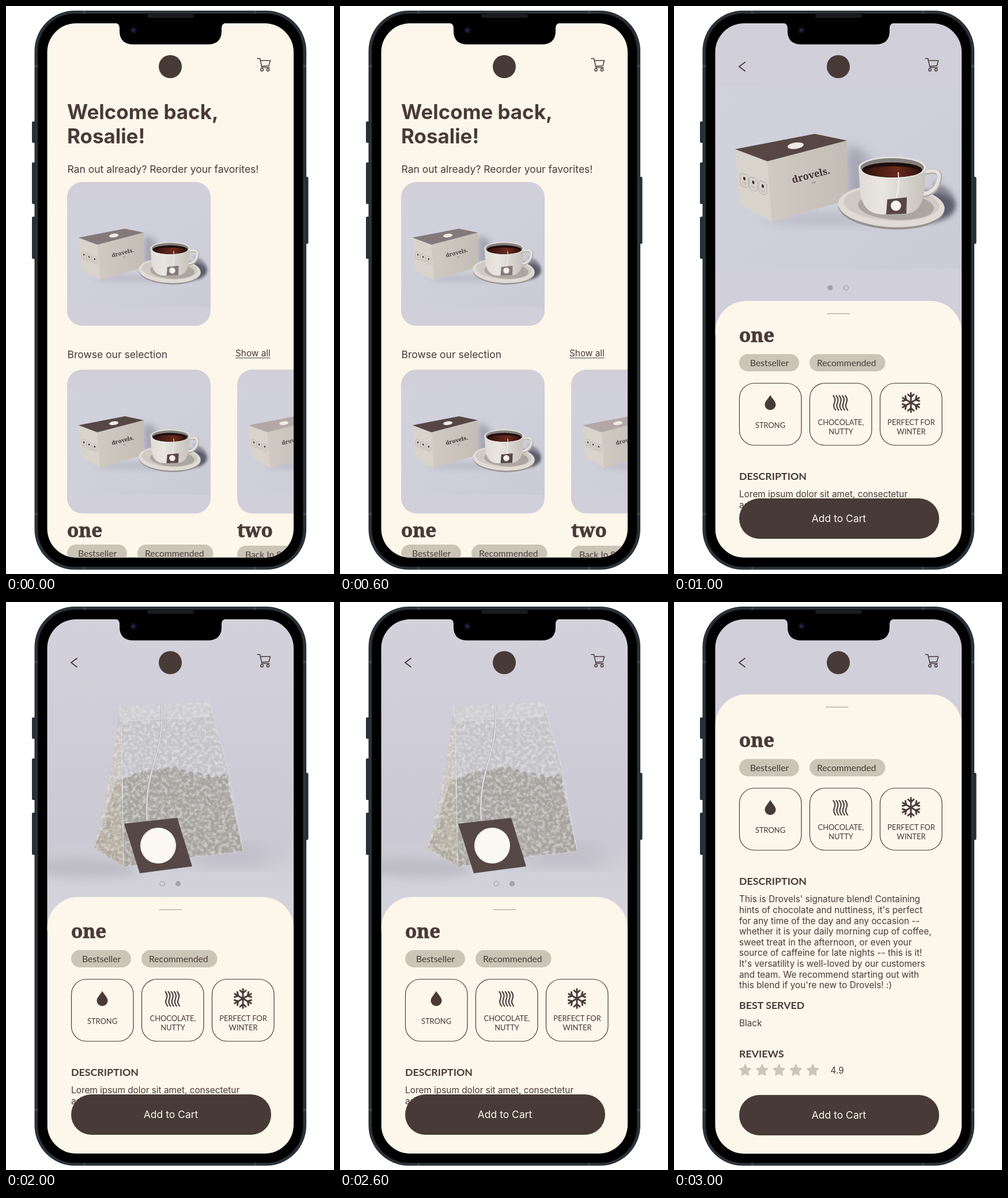
These frames come from a looping animation (569 px wide and 984 px high, 4 s). An HTML page:

```html
<!DOCTYPE html>
<html lang="en">
<head>
<meta charset="utf-8">
<title>Coffee shop app</title>
<style>
html, body { margin: 0; width: 100%; height: 100%; overflow: hidden; background: #fff; }
svg { display: block; width: 100vw; height: 100vh; }
text { font: 15.35px Inter, sans-serif; font-optical-sizing: none; fill: #483b37; white-space: pre; }
.h1 { font-size: 34.9px; font-weight: 700; }
.mid { font-size: 17.5px; }
.name { font: 900 33px "Noto Serif", serif; stroke: #483b37; stroke-width: .9; }
.pill { font: 15.7px Lato, sans-serif; }
.tag { font: 12.9px Lato, sans-serif; text-anchor: middle; }
.sec { font: 700 17.8px Lato, sans-serif; }
.btn { font-size: 17.5px; fill: #fdf6ea; text-anchor: middle; }
.brand { font: 900 16.5px "Noto Serif", serif; text-anchor: middle; }
.line { fill: none; stroke: #483b37; stroke-linecap: round; stroke-linejoin: round; }
</style>
</head>
<body>
<svg viewBox="0 0 569 984">
  <defs>
    <clipPath id="screenClip"><rect x="71.500" y="30" width="427.500" height="925.500" rx="50"/></clipPath>
    <clipPath id="tile"><rect x="72" y="83" width="427" height="427" rx="45"/></clipPath>
    <filter id="soft" x="-50%" y="-50%" width="200%" height="200%"><feGaussianBlur stdDeviation="4"/></filter>
    <filter id="blur" x="-50%" y="-50%" width="200%" height="200%"><feGaussianBlur stdDeviation="9"/></filter>
    <filter id="haze" x="-50%" y="-50%" width="200%" height="200%"><feGaussianBlur stdDeviation="18"/></filter>
    <filter id="fibre" x="0" y="0" width="100%" height="100%">
      <feTurbulence type="fractalNoise" baseFrequency=".16" numOctaves="4" seed="5"/>
      <feColorMatrix values="0 0 0 0 .94  0 0 0 0 .94  0 0 0 0 .95  3 0 0 0 -1.2"/>
      <feComposite in2="SourceGraphic" operator="in"/>
    </filter>
    <filter id="leaves" x="0" y="0" width="100%" height="100%">
      <feTurbulence type="fractalNoise" baseFrequency=".07" numOctaves="5" seed="8"/>
      <feColorMatrix values="0 0 0 0 .36  0 0 0 0 .35  0 0 0 0 .32  4 0 0 0 -1.8"/>
      <feComposite in2="SourceGraphic" operator="in"/>
    </filter>
    <linearGradient id="wall" x2="1" y2="1">
      <stop stop-color="#d2d2dc"/><stop offset=".55" stop-color="#cfcfda"/><stop offset="1" stop-color="#cbcbd7"/>
    </linearGradient>
    <linearGradient id="studio" x2="0" y2="1">
      <stop stop-color="#d3d2dc"/><stop offset=".7" stop-color="#cac9d4"/>
      <stop offset=".82" stop-color="#d2d1d9"/><stop offset="1" stop-color="#d5d3db"/>
    </linearGradient>
    <linearGradient id="china"><stop stop-color="#dfdbd5"/><stop offset=".35" stop-color="#e9e6e0"/><stop offset="1" stop-color="#c6c1bb"/></linearGradient>
    <linearGradient id="front"><stop stop-color="#d0cac2"/><stop offset="1" stop-color="#c4bdb6"/></linearGradient>
    <linearGradient id="coffee"><stop stop-color="#32120e"/><stop offset=".6" stop-color="#6b2a1d"/><stop offset="1" stop-color="#32120e"/></linearGradient>
  </defs>

  <g fill="#27313a">
    <rect x="45" y="200" width="8" height="37" rx="2"/>
    <rect x="45" y="271" width="8" height="72" rx="2"/>
    <rect x="45" y="365" width="8" height="73" rx="2"/>
    <rect x="517" y="296" width="7.500" height="116" rx="2"/>
  </g>
  <rect x="49.500" y="8" width="471.500" height="968.500" rx="70" fill="#232b2f"/>
  <rect x="52" y="10.500" width="466.500" height="963.500" rx="67.500" fill="none" stroke="#3b464b"/>
  <rect x="55.500" y="13.500" width="459.500" height="958" rx="64" fill="#000"/>
  <path d="M50 104h5M50 880h5M516 104h5M516 880h5M136 9v4M432 9v4M136 972v4M432 972v4" stroke="#3f4a50" stroke-width="4"/>
  <rect x="245" y="14" width="81" height="6.500" rx="3" fill="#191b1d"/>
  <g id="screen" clip-path="url(#screenClip)"></g>
  <path d="M189 29.500Q197 30 197 38V43Q197 66.500 221 66.500H350Q374 66.500 374 43V38Q374 30 382 29.500Z"/>
  <circle cx="221" cy="42" r="6" fill="#0e0e1a"/>
  <circle cx="221" cy="42" r="2.500" fill="#28275a"/>
</svg>
<script>
const INK = '#483b37', CREAM = '#fdf6ea', GREY = '#cbc5b8', LILAC = '#d0cfda';

const text = (x, y, s, cls = '') => `<text x="${x}" y="${y}" class="${cls}">${s}</text>`;
const rect = (x, y, w, h, r, fill, more = '') =>
  `<rect x="${x}" y="${y}" width="${w}" height="${h}" rx="${r}" fill="${fill}" ${more}/>`;
const path = (d, fill, more = '') => `<path d="${d}" fill="${fill}" ${more}/>`;
const line = (d, w = 1.5) => `<path d="${d}" class="line" stroke-width="${w}"/>`;
const oval = (x, y, rx, ry, fill, more = '') =>
  `<ellipse cx="${x}" cy="${y}" rx="${rx}" ry="${ry}" fill="${fill}" ${more}/>`;
const move = (x, y, s) => `<g transform="translate(${x} ${y})">${s}</g>`;

const cart = line('M436 91H440.500L444 106.500H457M441.500 94.500H458.500L456 103.500L443.500 104.500')
  + '<g class="line" stroke-width="1.5"><circle cx="444" cy="110.500" r="2.200"/><circle cx="454.500" cy="110.500" r="2.200"/></g>';
const header = oval(285, 105, 20, 20, INK) + cart;
const back = line('M123 97.500L113 105L123 112.500', 1.9);

// Tea box and cup; top colours the lid and the tag, ink the lettering
function product(top, ink = '#3d2f2d') {
  const badges = [[122, 302], [137.5, 308.5], [154, 315]].map(([x, y]) =>
    `<g transform="translate(${x} ${y}) skewY(20)">`
    + rect(-7, -11, 14, 22, 5, 'none', 'stroke="#a49d99" stroke-width=".7"')
    + oval(0, -3, 2, 3, ink) + path('M-4 4H4M-3 6.500H3', 'none', 'stroke="#a49d99" stroke-width=".6"') + '</g>').join('');
  return rect(72, 83, 427, 427, 0, LILAC)
    + rect(72, 139, 427, 316, 0, 'url(#wall)')
    + path('M298 246Q324 238 340 268L345 330H300Z', '#6b6b7c', 'opacity=".4" filter="url(#blur)"')
    + oval(436, 348, 52, 27, '#4b4c5c', 'opacity=".85" filter="url(#soft)"')
    + path('M450 304Q490 318 488 345L460 350Z', '#5b5c6c', 'opacity=".6" filter="url(#soft)"')
    + oval(265, 369, 110, 10, '#9d9dad', 'opacity=".4" filter="url(#blur)"')
    + path('M106 248L162 269L170 374L114 345Z', '#d8d3cb')
    + path('M162 269L300 233L301 336L170 374Z', 'url(#front)')
    + path('M106 248L244 221.500L300 233L162 269Z', top)
    + oval(211, 242, 14, 5.5, '#f1ebe4', 'transform="rotate(-8 211 242)"')
    + badges
    + `<g transform="translate(239 298.500) rotate(-14.500)"><text class="brand" style="fill:${ink}">drovels.</text>`
    + `<text x="1" y="9" style="font-size:4px;text-anchor:middle">one</text></g>`
    + '<g transform="rotate(3 377 347)">'
    + oval(377, 350, 92, 37, '#98928f')
    + oval(377, 346.5, 92.5, 36.5, '#e0dcd5')
    + oval(377, 343, 83, 29, '#cfcac3')
    + oval(385, 347, 66, 23, '#a19a96', 'opacity=".75"') + '</g>'
    + path('M433 289Q465 280 460 302Q455 324 431 328', 'none', 'stroke="#b3aeaa" stroke-width="9"')
    + path('M433 288Q464 279 459 301Q454 323 431 326', 'none', 'stroke="#e5e2dc" stroke-width="6"')
    + path('M320 279L323 323Q328 360 360 361H397Q429 360 434 323L437 279Z', 'url(#china)')
    + oval(378.5, 280, 58.5, 19, '#ebe8e2')
    + oval(378.5, 280, 55, 16.5, '#85807e')
    + oval(378.5, 284, 52, 13, '#1c0e0c')
    + oval(378.5, 287, 48, 9.5, 'url(#coffee)')
    + path('M389 288Q392 314 385 334', 'none', 'stroke="#f7f3ec" stroke-width="1.8"')
    + path('M370 335L404 331.500L403 360L368 361Z', top)
    + oval(385, 346, 9, 9, '#f7f1e9');
}

const tile = (x, y, top, ink) =>
  `<g transform="translate(${x} ${y}) scale(.583) translate(-72 -83)" clip-path="url(#tile)">${product(top, ink)}</g>`;

const pill = (x, y, w, tx, s) => rect(x, y, w, 30, 15, GREY) + text(tx, y + 20.5, s, 'pill');
const pills = (x, y) => pill(x, y, 104, x + 19, 'Bestseller') + pill(x + 122, y, 131.5, x + 135, 'Recommended');

const home = rect(71, 30, 428, 926, 0, CREAM) + header
  + text(106, 195.5, 'Welcome back,', 'h1') + text(106, 238, 'Rosalie!', 'h1')
  + text(106.5, 289, 'Ran out already? Reorder your favorites!', 'mid')
  + tile(106, 305, '#83797a', '#483b3a')
  + text(106.5, 610, 'Browse our selection', 'mid')
  + text(398, 606.5, 'Show all') + line('M398.500 609.800H458', 1.1)
  + tile(106, 630, '#564745') + tile(401, 630, '#b3a8a6', '#483b3a')
  + text(106, 920, 'one', 'name') + text(401, 920, 'two', 'name')
  + pills(106, 933) + pill(401, 935, 125, 415, 'Back In Stock');

function teaBag() {
  const front = 'M195 181L352 172L384 285L412 432L325 442L204 459L200 240Z';
  const side = 'M196 190L201 240L204 459L152 427Q184 300 196 190Z';
  let tea = 'M203 306';
  for (let i = 0; i < 13; i++)
    tea += `q7 ${-7 - 9 * Math.abs(Math.sin(i * 2.3))} 14 ${4 * Math.sin(i * .55 + 3.6)}`;
  tea += 'L386 322L411 431L325 441L204 458Z';
  const leaf = 'M190 312L201 306L204 458L153 426Q174 370 190 312Z';
  return rect(71, 30, 428, 540, 0, 'url(#studio)')
    + path('M60 448Q130 440 210 452L230 472Q130 484 60 470Z', '#a9a8b4', 'opacity=".5" filter="url(#blur)"')
    + oval(390, 440, 80, 14, '#a09fac', 'opacity=".5" filter="url(#haze)"')
    + path(side, '#c8c4bf') + path(leaf, '#b0a798', 'opacity=".7"')
    + path(front, '#c3c3c8') + path(tea, '#a09d97', 'opacity=".8"')
    + path(tea + leaf, '#000', 'filter="url(#leaves)" opacity=".55"')
    + path(side + front, '#000', 'filter="url(#fibre)" opacity=".45"')
    + path('M195 181L352 172L355 198L197 207Z', '#dddde2', 'opacity=".4"')
    + path('M197 207L356 198M200 215L204 459M352 172L384 285L412 432', 'none', 'stroke="#e4e3e6" stroke-width="1" opacity=".7"')
    + path('M270 180C276 265 238 290 245 378', 'none', 'stroke="#a7a5a8" stroke-width="3.6"')
    + path('M270 180C276 265 238 290 245 378', 'none', 'stroke="#e0dfe0" stroke-width="2.2"')
    + path('M205 384L297 374L323 458L232 470Z', '#564847')
    + oval(264, 422, 31, 31, '#fbf7f1');
}

const dots = on => [271, 298.5].map((x, i) =>
  oval(x, 488, 4, 4, i === on ? '#a3a0a9' : 'none', 'stroke="#a3a0a9" stroke-width="1.2"')).join('');

function features() {
  let s = [113, 235, 357].map(x =>
    rect(x + .5, 653.5, 107.5, 107.5, 26, 'none', `stroke="${INK}" stroke-width="1.2"`)).join('');
  s += path('M167 674C171 681 176.500 685 176.500 691A9.500 9 0 0 1 157.500 691C157.500 685 163 681 167 674Z', INK);
  for (let i = 0; i < 5; i++) s += line(`M${276.3 + i * 5.2} 675q5 6 2 12.500t2 12.500`, 2.1);
  for (let a = 0; a < 360; a += 60)
    s += `<g transform="translate(411 687) rotate(${a})">${line('M0 0V-16.500M-5 -14L0 -9.500L5 -14', 2.9)}</g>`;
  return s + text(167, 731, 'STRONG', 'tag')
    + text(289.5, 726, 'CHOCOLATE,', 'tag') + text(289.5, 742, 'NUTTY', 'tag')
    + text(411.5, 726, 'PERFECT FOR', 'tag') + text(411.5, 742, 'WINTER', 'tag');
}

const panel = (y, handle) => rect(71.5, y, 427.5, 1000, 54, CREAM)
  + path(`M${handle} ${y + 22}h39.500`, 'none', `stroke="${GREY}" stroke-width="2"`);
const details = lines => text(113, 582, 'one', 'name') + pills(113, 603) + features()
  + text(113, 820.5, 'DESCRIPTION', 'sec')
  + lines.map((s, i) => text(113, 851.3 + i * 18.63, s)).join('');
const button = rect(113, 853, 347, 70, 35, INK) + text(286, 893.5, 'Add to Cart', 'btn');

const sheet = panel(511, 265.5)
  + details(['Lorem ipsum dolor sit amet, consectetur', 'adipiscing elit']) + button;

const blurb = `This is Drovels' signature blend! Containing
hints of chocolate and nuttiness, it's perfect
for any time of the day and any occasion --
whether it is your daily morning cup of coffee,
sweet treat in the afternoon, or even your
source of caffeine for late nights -- this is it!
It's versatility is well-loved by our customers
and team. We recommend starting out with
this blend if you're new to Drovels! :)`.split('\n');

function star(x, y) {
  const pts = [];
  for (let i = 0; i < 10; i++) {
    const a = i * Math.PI / 5, r = i % 2 ? 4.8 : 10;
    pts.push([x + r * Math.sin(a), y - r * Math.cos(a)]);
  }
  return path(`M${pts.join('L')}Z`, GREY, `stroke="${GREY}" stroke-width="2" stroke-linejoin="round"`);
}

const full = rect(71, 30, 428, 926, 0, LILAC) + header + back
  + panel(160, 263) + move(0, -331, details(blurb))
  + text(113, 704.5, 'BEST SERVED', 'sec') + text(113, 735, 'Black')
  + text(113, 789, 'REVIEWS', 'sec')
  + [0, 1, 2, 3, 4].map(i => star(123.5 + i * 29.3, 811.5)).join('')
  + text(271.5, 816.5, '4.9') + move(0, 1, button);

const scenes = [
  home,
  rect(71, 30, 428, 540, 0, LILAC) + product('#564745') + header + back + dots(0) + sheet,
  teaBag() + header + back + dots(1) + sheet,
  full
];
const screen = document.getElementById('screen');
screen.innerHTML = scenes.map(s => `<g>${s}</g>`).join('');

function draw(now) {
  const current = Math.floor(now % 4000 / 1000);
  [...screen.children].forEach((g, i) => g.style.display = i === current ? '' : 'none');
  requestAnimationFrame(draw);
}
draw(performance.now());
</script>
</body>
</html>
```
